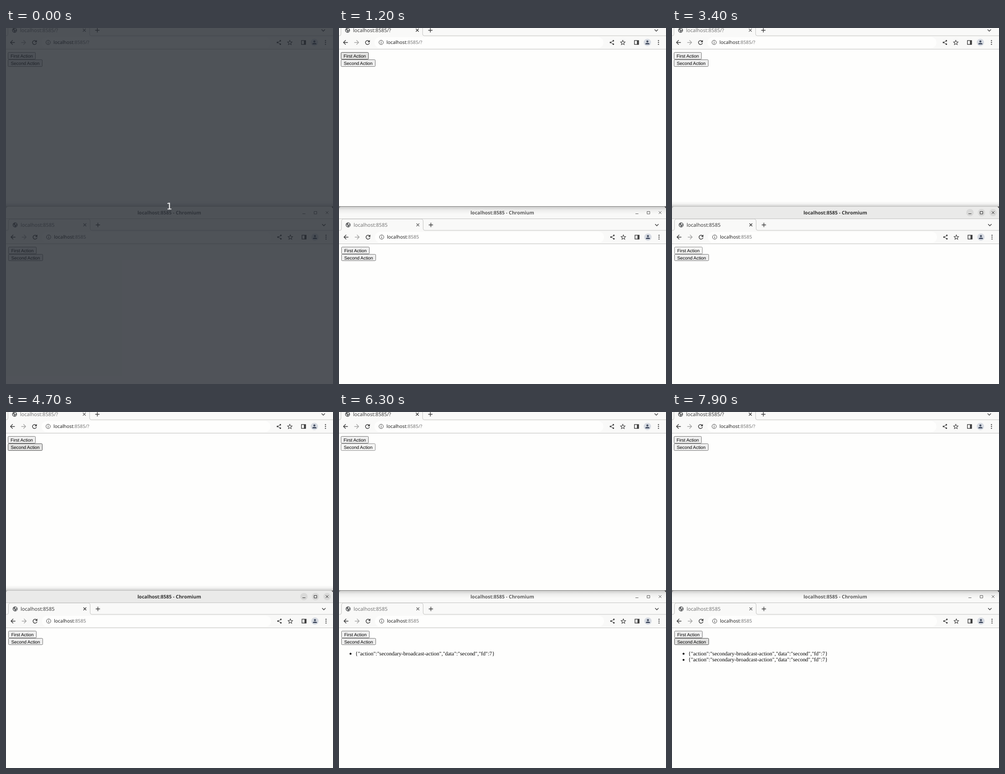
Recreate the animation shown at these times as an HTML page. Size 717x781 px, loop 8000 ms.

```html
<!DOCTYPE html>
<html lang="en">
<head>
<meta charset="utf-8">
<title>Broadcast actions</title>
<style>
html, body { margin: 0; width: 100%; height: 100%; overflow: hidden; background: #fefefd; }
svg { display: block; text-rendering: geometricPrecision; }
text { white-space: pre; }
.ui { font-family: "Noto Sans", "Open Sans", sans-serif; }
.line { fill: none; stroke: #c3c3c1; }
.icon { fill: none; stroke: #3d3d3d; stroke-width: 1.4; }
.solid { fill: #3d3d3d; stroke: none; }
.tab { font-size: 11px; fill: #757575; }
.cross { fill: none; stroke: #666; stroke-width: 1.3; }
.focus .tab { fill: #3a3a3a; }
.focus .cross { stroke: #333; }
.url { font-size: 10.35px; fill: #222; }
.url tspan { fill: #757575; }
.bar { fill: #f9f9f8; }
.title { font-size: 10.55px; font-weight: bold; fill: #5c5c5c; }
.controls { fill: none; stroke: #5c5c5c; }
.disc { fill: none; stroke: none; }
.focus .bar { fill: #eaeae9; }
.focus .title { fill: #303030; }
.focus .controls { stroke: #303030; }
.focus .disc { fill: #d9d9d8; }
.button rect { fill: #efefef; stroke: #767676; }
.button.hover rect { fill: #e3e3e2; stroke: #4f4f4f; }
.button.press rect { fill: #f5f5f4; stroke: #8d8d8d; }
.button text { font: 9.9px "Liberation Sans", Arial, sans-serif; text-anchor: middle; }
.message { font: 11.95px "Liberation Serif", "Times New Roman", serif; }
#count { font: 20px "DejaVu Sans", sans-serif; fill: #fff; text-anchor: middle; }
</style>
</head>
<body>
<svg id="stage" width="717" height="781" viewBox="0 0 717 781"></svg>
<script>
const stage = document.getElementById('stage');
const $ = id => document.getElementById(id);

// Tab strip and toolbar, laid out for the lower window
const chrome = path => `
  <rect x="-2" y="418" width="722" height="56" fill="#f9f9f8"/>
  <path class="line" d="M-2 444H2.500Q5.500 444 5.500 440V424Q5.500 419 10.500 419H179.500Q184.500 419 184.500 424V440Q184.500 444 188 444H720"/>
  <rect x="79" y="447" width="502" height="24" rx="12" fill="#fefefd"/>
  <path class="line" d="M-2 473.500H720"/>
  <circle cx="20" cy="432" r="5.400" fill="#5f6163"/>
  <path d="M16 430.500l3 2.500v3l-2-1.500zM20.500 427.800l3 1.700-1.500 2.500-2.500-1zM21.500 433.500l2.500-.5-2 3z" fill="#f0f0ef"/>
  <text class="ui tab" x="31.900" y="435.700">localhost:8585${path}</text>
  <path class="cross" d="M169.800 428.800l6.200 6.200m0-6.200l-6.200 6.200"/>
  <path class="icon" d="M196.800 432h9.400m-4.700-4.700v9.400M693.200 430.200l3.700 3.700 3.700-3.700"/>
  <path class="icon" d="M20.600 458.700H11m4.900-4.900l-4.900 4.900 4.900 4.900"/>
  <path class="icon" d="M34.700 458.700h9.600m-4.900-4.900l4.900 4.900-4.900 4.900" style="stroke:#a6a6a5"/>
  <path class="icon" d="M67.300 456.300a4.400 4.400 0 1 0 .7 3.600"/>
  <path class="solid" d="M68.800 453.200v5h-5z"/>
  <circle class="icon" cx="93.600" cy="458.600" r="4.700" style="stroke-width:1"/>
  <path class="icon" d="M93.600 458v3.300m0-5.500v1.200" style="stroke-width:1.100"/>
  <text class="ui url" x="105.200" y="462.300">localhost<tspan>:8585${path}</tspan></text>
  <path class="icon" d="M603 455.300l-6.600 3.400 6.600 3.600" style="stroke-width:1"/>
  <g class="solid"><circle cx="602.700" cy="455" r="1.700"/><circle cx="596.400" cy="458.700" r="1.700"/><circle cx="602.700" cy="462.500" r="1.700"/></g>
  <path class="icon" d="M623.500 454l1.400 3.300 3.600.3-2.700 2.400.8 3.500-3.100-1.900-3.100 1.900.8-3.500-2.700-2.400 3.600-.3z" style="stroke-width:1.100"/>
  <rect class="icon" x="649" y="454.500" width="9" height="8.500"/>
  <path class="solid" d="M654.500 454h4v9.500h-4z"/>
  <circle cx="677.400" cy="458.700" r="8" fill="#d7dbe2"/>
  <g fill="#465064"><circle cx="677.400" cy="456.500" r="2.300"/><path d="M672.900 463v-1q0-2.300 4.500-2.300t4.500 2.300v1z"/></g>
  <g class="solid"><circle cx="701.700" cy="454.700" r="1.200"/><circle cx="701.700" cy="458.800" r="1.200"/><circle cx="701.700" cy="462.900" r="1.200"/></g>`;

const button = (id, x, y, w, h, label) => `
  <g id="${id}" class="button"><rect x="${x}" y="${y}" width="${w}" height="${h}" rx="1.800"/>
  <text x="${x + w / 2}" y="${y + 11}">${label}</text></g>`;

const message = (id, y) => `
  <g id="${id}"><circle cx="25.300" cy="${y - 3.3}" r="2.100"/>
  <text class="message" x="35.700" y="${y}">{"action":"secondary-broadcast-action","data":"second","fd":7}</text></g>`;

const fade = (id, from, to) => `
  <linearGradient id="${id}" x1="0" y1="0" x2="0" y2="1">
  <stop stop-opacity="${from}"/><stop offset=".5" stop-opacity="${(from + to) / 4}"/><stop offset="1" stop-opacity="${to}"/></linearGradient>`;

stage.innerHTML = `
  <defs>${fade('above', 0, .17)}${fade('below', .2, 0)}</defs>
  <rect width="717" height="781" fill="#fefefd"/>
  <g id="top">
    <g transform="translate(-1.200 -427)">${chrome('/?')}</g>
    ${button('a1', 4.5, 53.5, 60, 15, 'First Action')}
    ${button('a2', 4.5, 69.5, 75, 15, 'Second Action')}
  </g>
  <rect id="glow" y="380" width="717" height="11" fill="url(#above)"/>
  <g id="bottom">
    <path d="M0 391H8L0 397z" fill="#b5b5b4"/>
    <path d="M711 391h6v5z" fill="#333"/>
    <path class="bar" d="M0 419V396Q2 391 8 391H709Q715 391 717 396V419z"/>
    <rect id="shade" y="391" width="717" height="17" fill="url(#below)"/>
    <path id="edge" d="M0 391.500H717" stroke="#bdbdbc"/>
    <text class="ui title" x="358" y="409.300" text-anchor="middle">localhost:8585 - Chromium</text>
    <g class="disc"><circle cx="653.300" cy="405" r="8"/><circle cx="678.600" cy="405" r="8"/><circle cx="704" cy="405" r="8"/></g>
    <path class="controls" d="M650 407.500h6.500M675.500 402.500h6v5.500h-6zM701 402l6 6m0-6l-6 6"/>
    ${chrome('')}
    <path class="line" d="M0 418.500H717"/>
    ${button('b1', 5.5, 480.5, 61, 15, 'First Action')}
    ${button('b2', 5.5, 496.5, 75, 14, 'Second Action')}
    ${message('m1', 533.7)}
    ${message('m2', 547.1)}
  </g>
  <g id="intro"><rect width="717" height="781" fill="rgb(36,40,48)" fill-opacity=".8"/>
  <text id="count" x="358" y="398">1</text></g>`;

// [start in ms, button, state]
const pointer = [
  [0], [300, 'a2', 'hover'], [500, 'a1', 'hover'], [1000, 'a1', 'press'], [1200, 'a1', 'hover'],
  [2200, 'a2', 'hover'], [2300], [3000, 'b1', 'hover'], [3400, 'b1', 'press'], [3500, 'b1', 'hover'],
  [4200], [4700, 'a2', 'hover'], [5000, 'a2', 'press'], [5200, 'a2', 'hover'], [6300, 'a2', 'press'],
  [6500, 'a2', 'hover'], [7200], [7800, 'b1', 'hover'], [7900, 'b2', 'hover']
];
const focus = [[0], [1000, 'top'], [3400, 'bottom'], [5000, 'top']];

const at = (list, t) => list.findLast(step => step[0] <= t);
const show = (id, on) => $(id).setAttribute('visibility', on ? 'visible' : 'hidden');

function draw(now) {
  const t = now % 8000;
  const [, target, state] = at(pointer, t);
  const active = at(focus, t)[1];
  for (const id of ['a1', 'a2', 'b1', 'b2'])
    $(id).setAttribute('class', 'button ' + (id === target ? state : ''));
  for (const id of ['top', 'bottom'])
    $(id).setAttribute('class', id === active ? 'focus' : '');
  const topRaised = active === 'top';
  show('shade', topRaised);
  show('glow', !topRaised);
  $('edge').setAttribute('stroke', topRaised ? '#777776' : '#bdbdbc');
  show('m1', t >= 5200);
  show('m2', t >= 6500);
  show('intro', t < 100);
}

function loop() {
  draw(performance.now());
  requestAnimationFrame(loop);
}
loop();
</script>
</body>
</html>
```
